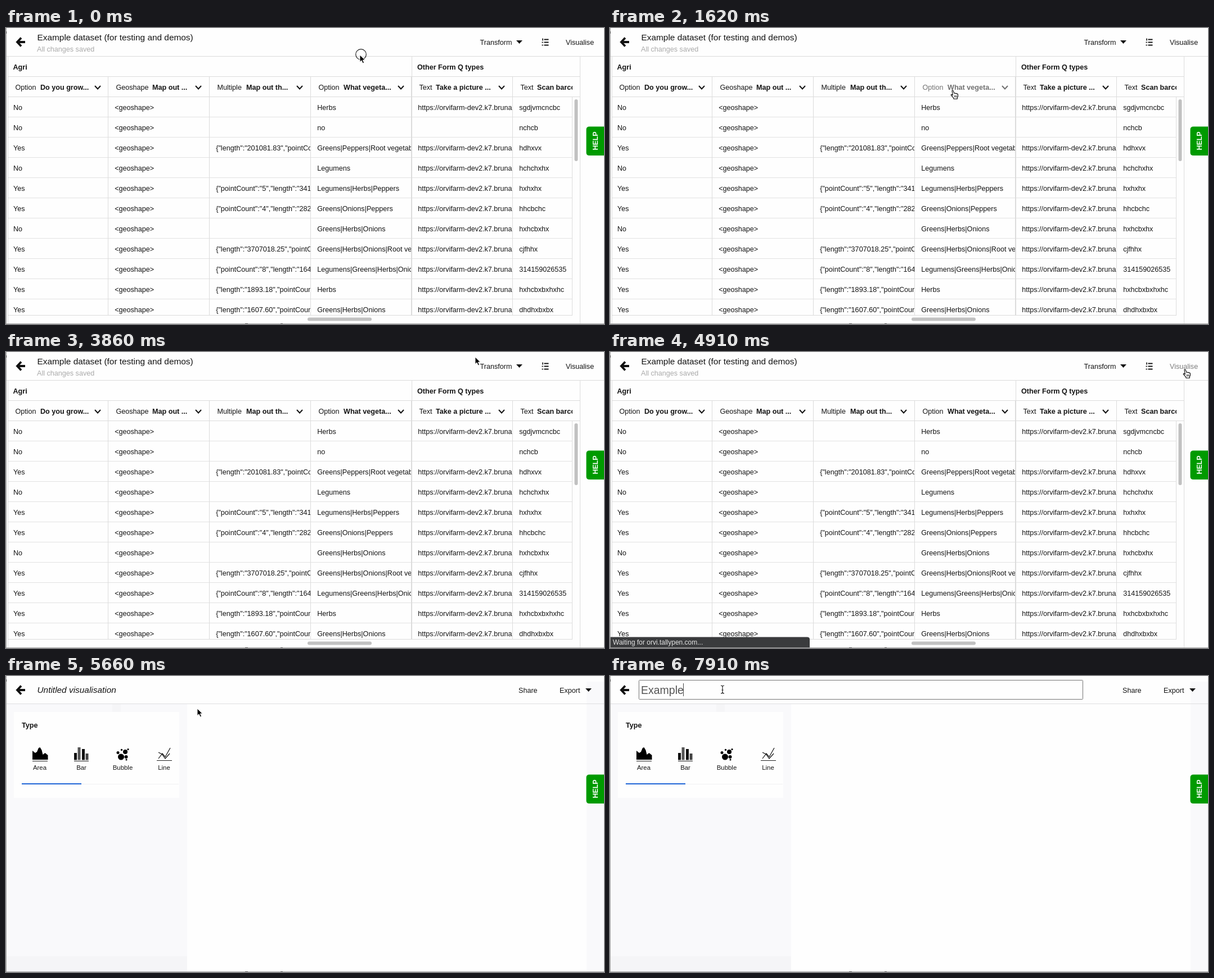
Write an HTML page that moves like this. It is 1063 by 527 pixels and loops after 8000 ms.

```html
<!DOCTYPE html>
<html lang="en">
<head>
<meta charset="utf-8">
<title>Dataset to visualisation</title>
<style>
  html, body { margin: 0; width: 100%; height: 100%; overflow: hidden; background: #fff; }
  svg { display: block; }
  text { font: 12.6px "Liberation Sans", Arial, sans-serif; fill: #141414; white-space: pre; }
  .bold { font-weight: bold; }
  .title { font-size: 15.4px; }
  .italic { font-style: italic; }
  .small { font-size: 11.4px; }
  .muted { fill: #aaa; }
  .help { font-size: 12.4px; fill: #fff; }
  .status { font-size: 12px; fill: #e4e4e4; }
  .typed { font-size: 19.5px; fill: #555; }
</style>
</head>
<body>
<svg id="stage" width="1063" height="527" viewBox="0 0 1063 527">
  <g id="table"></g>
  <g id="chart"></g>
  <g id="common"></g>
  <g id="status"></g>
  <g id="pointer"></g>
</svg>
<script>
const LOOP = 8000;
const $ = id => document.getElementById(id);

function add(parent, tag, attrs = {}, content) {
  const node = document.createElementNS("http://www.w3.org/2000/svg", tag);
  for (const key in attrs) node.setAttribute(key, attrs[key]);
  if (content !== undefined) node.textContent = content;
  return parent.appendChild(node);
}
const rect = (p, x, y, width, height, fill, more) => add(p, "rect", { x, y, width, height, fill, ...more });
const text = (p, x, y, content, cls = "", more) => add(p, "text", { x, y, class: cls, ...more }, content);
const path = (p, d, more) => add(p, "path", { d, ...more });
const stroke = (p, d, color, width, more) => path(p, d, { fill: "none", stroke: color, "stroke-width": width, ...more });
const clip = (p, x, y, width, height) => add(p, "svg", { x, y, width, height, overflow: "hidden" });
const show = (node, on) => node.setAttribute("visibility", on ? "inherit" : "hidden");

const INK = "#141414", PAPER = "#fefefe", PALE = "#f9f9fb", SHADE = "#f5f5f7", RULE = "#dcdcdc", THUMB = "#c1c1c1";

// Table page
const table = $("table");
const edges = [3, 182, 362, 542, 721, 901, 1007];
const heads = [
  ["Option", "Do you grow...", 61], ["Geoshape", "Map out ...", 260], ["Multiple", "Map out th...", 427],
  ["Option", "What vegeta...", 600], ["Text", "Take a picture ...", 764], ["Text", "Scan barcode", 944]
];
const link = "https://orvifarm-dev2.k7.brunastore";
const rows = [
  ["No", "", "Herbs", link, "sgdjvmcncbc"],
  ["No", "", "no", "", "nchcb"],
  ["Yes", '{"length":"201081.83","pointCount"', "Greens|Peppers|Root vegetables", link, "hdhxvx"],
  ["No", "", "Legumens", link, "hchchxhx"],
  ["Yes", '{"pointCount":"5","length":"3410"', "Legumens|Herbs|Peppers", link, "hxhxhx"],
  ["Yes", '{"pointCount":"4","length":"2820"', "Greens|Onions|Peppers", link, "hhcbchc"],
  ["No", "", "Greens|Herbs|Onions", link, "hxhcbxhx"],
  ["Yes", '{"length":"3707018.25","pointCount"', "Greens|Herbs|Onions|Root vegetables", link, "cjfhhx"],
  ["Yes", '{"pointCount":"8","length":"1640"', "Legumens|Greens|Herbs|Onions", link, "314159026535"],
  ["Yes", '{"length":"1893.18","pointCount"', "Herbs", link, "hxhcbxbxhxhc"],
  ["Yes", '{"length":"1607.60","pointCount"', "Greens|Herbs|Onions", link, "dhdhxbxbx"]
];

rect(table, 0, 0, 1063, 527, PAPER);
text(table, 55.5, 21.5, "Example dataset (for testing and demos)", "title");
text(table, 55, 41.5, "All changes saved", "muted");
text(table, 842.5, 29.5, "Transform");
path(table, "M907 22h11l-5.5 6z", { fill: INK });
stroke(table, "M956.5 20.5h8M956.5 25.5h8M956.5 30.5h8", INK, 1.8);
stroke(table, "M954 18.5v4M952.5 25.5h2.5M952.5 30.5h2.5", INK, 1.6);
const visualise = text(table, 995, 29.5, "Visualise");
text(table, 12.5, 74, "Agri", "bold");
text(table, 731, 74, "Other Form Q types", "bold");

const headGroups = heads.map(([type, name, nameX], i) => {
  const x = edges[i];
  const box = clip(table, x, 87, edges[i + 1] - x, 36);
  text(box, 13.5, 22.5, type);
  text(box, nameX - x, 22.5, name, "bold");
  if (i < 5) stroke(box, "M155 16l5 5.5l5 -5.5", INK, 2);
  return box;
});

const body = clip(table, 0, 123, 1007, 388);
rows.forEach(([grow, shape, veg, picture, code], r) => {
  [grow, "<geoshape>", shape, veg, picture, code].forEach((value, c) => {
    const cell = clip(body, edges[c], r * 36, edges[c + 1] - edges[c], 36);
    text(cell, c ? 11.2 : 10, 23, value);
  });
  stroke(body, `M3 ${r * 36 + 35.5}H1007`, "#e2e2e2", 1);
});
stroke(table, "M0 50.5H1063M3 86.5H1020M3 122.5H1020M3 511.5H1007M721.5 51V511M1020.5 51V526M3.5 51V526", RULE, 1);
stroke(table, edges.slice(1).map(x => `M${x - .5} ${x > 1000 ? 123 : 87}V511`).join(""), RULE, 1);
rect(table, 1010.5, 127, 6, 110, THUMB, { rx: 3 });
rect(table, 536, 515.5, 114, 6, THUMB, { rx: 3 });

// Chart page
const chart = $("chart");
rect(chart, 0, 0, 1063, 527, PAPER);
rect(chart, 1, 10, 1062, 517, PALE);
const seam = rect(chart, 321, 499, 1, 8, "#eaeaed");
const panels = add(chart, "g");
rect(panels, 1, 0, 1031, 50, PAPER);
rect(panels, 322, 50, 710, 477, PAPER);
rect(panels, 189, 50, 15, 14, SHADE);
rect(panels, 1, 499, 321, 27, SHADE);
rect(panels, 14, 64, 294, 153, PAPER);
rect(panels, 134, 192, 173, 1, "#f0f0f2");
stroke(chart, "M0 49.5H1063", "#dedee0", 1);
text(chart, 28, 91.5, "Type", "bold");
rect(chart, 28, 191, 106, 2, "#1f65d6");
[["Area", 60], ["Bar", 134], ["Bubble", 207.5], ["Line", 281]].forEach(([label, x]) =>
  text(chart, x, 167, label, "small", { "text-anchor": "middle" }));
path(chart, "M47 149V133l5 4l3 -2l3 -7l2.5 -1l3 5l2 8l4 -3l5 4v8z");
stroke(chart, "M47 151.5h27M121 151.5h26M268 150.5h27", "#222", 1);
[[121, 137, "#111"], [127.5, 127, "#555"], [135, 130, "#111"], [141.5, 138, "#444"]].forEach(([x, y, fill]) =>
  rect(chart, x, y, 5, 149.5 - y, fill));
[[204.5, 144, 5.5], [212, 135, 4], [213.5, 144, 3], [199, 136.5, 2.5], [205.5, 131.5, 1.7], [217, 130.5, 1.6], [214, 149, 1.5]]
  .forEach(([cx, cy, r]) => add(chart, "circle", { cx, cy, r }));
stroke(chart, "M271 147l7 -9l5 6l9 -16M271 136l6 3l6 8l8 -9", "#111", 1.2);
text(chart, 911, 29.5, "Share");
text(chart, 984, 29.5, "Export");
path(chart, "M1030 22h11l-5.5 6z", { fill: INK });
const untitled = text(chart, 55.5, 29.5, "Untitled visualisation", "title italic");
const field = add(chart, "g");
rect(field, 51.5, 7.5, 789, 34, PAPER, { stroke: "#757575", rx: 1 });
const typed = text(field, 55, 31.5, "", "typed");
const caret = rect(field, 55, 13, 1, 23, "#444");

// Shared by both pages
const common = $("common");
stroke(common, "M27 17.5l-7 7.5l7 7.5M21 25H34", "#111", 3.8);
path(common, "M1063 175.5h-26q-5.5 0 -5.5 5.500v41q0 5 5.5 5h26z", { fill: "#009a00" });
text(common, 0, 0, "HELP", "bold help", { transform: "translate(1052 201) rotate(-90)", "text-anchor": "middle" });
stroke(common, "M.5 0V527M0 526.5H1063", "#a5a5a5", 1);
stroke(common, "M425 526.5h5M488 526.5h4M.5 6v4", "#444", 1);

const status = $("status");
path(status, "M1 507.5H351q4 0 4 4v14.5H1z", { fill: "#3a3b3d" });
text(status, 5, 521, "Waiting for orvi.tallypen.com...", "status");

// Pointer shapes, each with its hot spot at 0,0
const pointer = $("pointer");
const shapes = { click: add(pointer, "g"), arrow: add(pointer, "g"), hand: add(pointer, "g"), beam: add(pointer, "g") };
add(shapes.click, "circle", { cx: 2, cy: -1, r: 9.3, fill: "none", stroke: "#222", "stroke-width": 1.2 });
for (const name of ["click", "arrow"])
  path(shapes[name], "M0 0V12.5l3 -2.7l2.2 5l2.3 -1l-2.2 -4.8h4z", { fill: "#000", stroke: "#fff", "stroke-width": .9 });
path(shapes.hand, "M0 .5q1.5 -1.2 2.3 .6l1.5 4.2q1.5 -.8 2.3 .3q1.5 -.8 2.3 .6q1.7 -.4 2 1.3l.1 3l-1.2 2.5v2.3h-6.3l-.3 -1.6l-4.3 -5q-.6 -1.7 1.2 -1.3l1.7 1.4z",
  { fill: "#fff", stroke: "#000", "stroke-width": 1.1, "stroke-linejoin": "round" });
stroke(shapes.hand, "M4.5 9v3.5M6.3 9v3.5M8.1 9v3.5", "#000", .8);
stroke(shapes.beam, "M-3 -7q3 0 3 2q0 -2 3 -2M0 -5V5M-3 7q3 0 3 -2q0 2 3 2M-1.5 1h3", "#111", 1.1);

// Time, x, y and, where it changes, the pointer shape
const steps = [
  [0, 629, 48, "click"], [140, 629, 49, "arrow"], [290, 629, 55], [440, 626, 69], [590, 618, 87],
  [740, 611, 103, "hand"], [890, 609, 109], [1190, 608, 110], [1620, 608, 111], [1770, 605, 114], [1920, 594, 120],
  [2070, 580, 130, "arrow"], [2220, 572, 136], [2370, 572, 150], [2520, 573, 172], [2670, 574, 202], [2820, 575, 230],
  [2970, 575, 244], [3270, 574, 262], [3420, 570, 318], [3570, 571, 351], [3720, 702, 170], [3860, 834, 9],
  [4010, 880, 6], [4160, 958, 12], [4310, 1003, 19], [4460, 1016, 26, "hand"], [4610, 1020, 30], [4760, 1021, 31],
  [5210, 985, 44, "arrow"], [5360, 810, 96], [5510, 560, 84], [5660, 340, 58], [5810, 225, 34],
  [5960, 201, 25, "beam"], [6110, 200, 24]
];
let shapeSoFar;
for (const step of steps) shapeSoFar = step[3] = step[3] || shapeSoFar;

const between = (t, from, to) => t >= from && t < to;

function draw(t) {
  const [, x, y, shape] = steps.findLast(step => step[0] <= t);
  pointer.setAttribute("transform", `translate(${x} ${y})`);
  for (const name in shapes) show(shapes[name], name === shape);

  headGroups[3].setAttribute("opacity", between(t, 740, 2070) ? .6 : 1);
  visualise.setAttribute("opacity", t >= 4460 ? .55 : 1);
  show(table, t < 5060);
  show(chart, t >= 5060);
  show(status, between(t, 4910, 5360));
  show(panels, t >= 5210);
  show(seam, t < 5210);

  const editing = t >= 6260;
  show(untitled, !editing);
  show(field, editing);
  const value = "Example".slice(0, Math.max(0, Math.floor((t - 7010) / 150) + 1));
  if (typed.textContent !== value) typed.textContent = value;
  caret.setAttribute("x", 55 + (value ? Math.floor(typed.getComputedTextLength()) : 0));
}

const start = performance.now();
function tick() {
  draw((performance.now() - start) % LOOP);
  requestAnimationFrame(tick);
}
tick();
</script>
</body>
</html>
```
